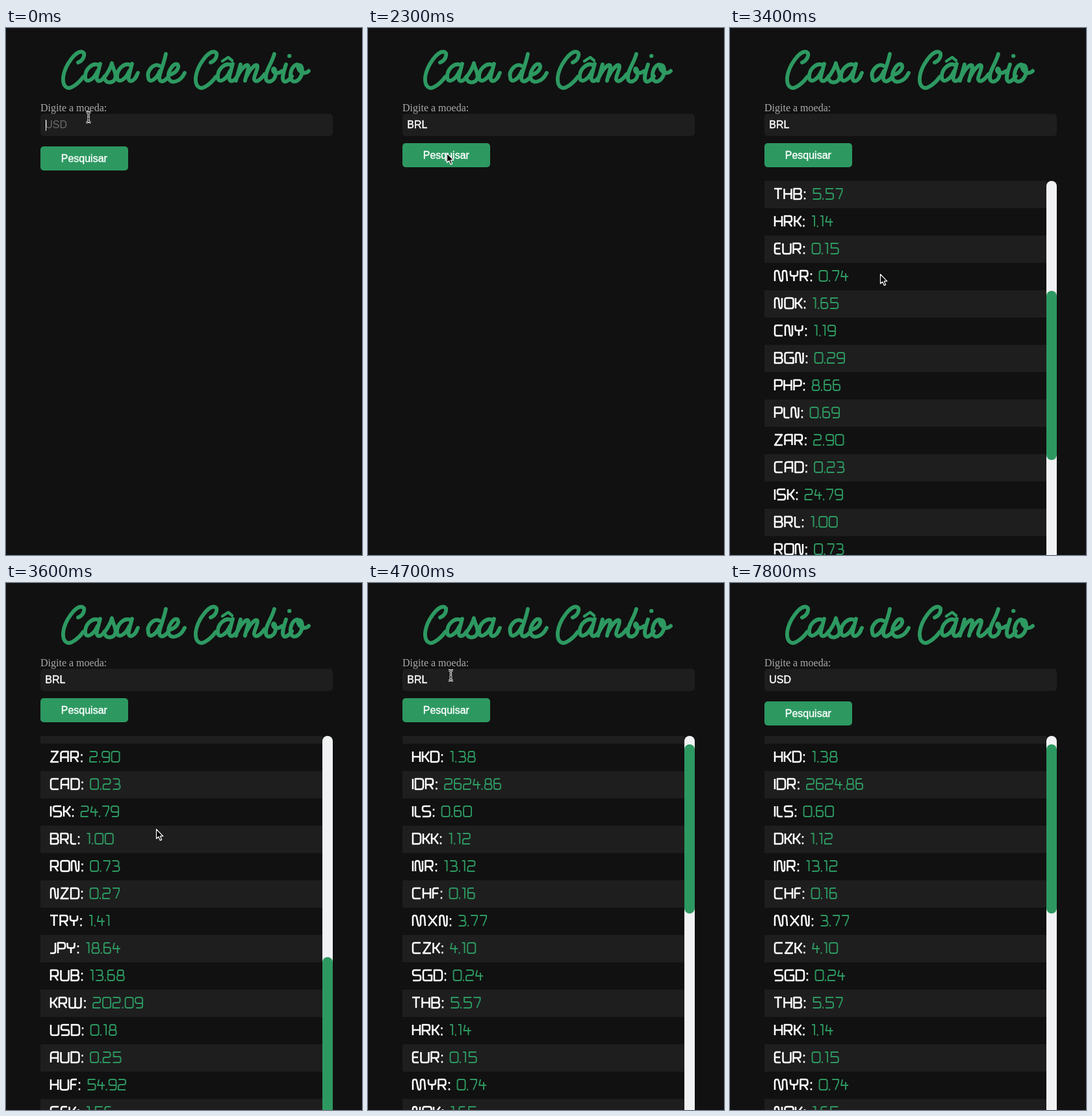
Animation of 548x810 px, one loop 8000 ms. Source, as an HTML page:

```html
<!DOCTYPE html>
<html lang="pt-BR">
<head>
<meta charset="utf-8">
<title>Casa de Câmbio</title>
<style>
  html, body { margin: 0; width: 100%; height: 100%; overflow: hidden; background: #111; }
  svg { display: block; width: 100vw; height: 100vh; }
  text { font: 16px "Liberation Sans", Arial, sans-serif; fill: #fff; stroke: #fff; stroke-width: .4; white-space: pre; }
  .label { font-family: "Liberation Serif", "Times New Roman", serif; fill: #aaa; stroke: none; }
  .hint { fill: #6c6c6c; stroke: none; }
  .panel { fill: #1e1e1e; }
  .green { fill: #2d9961; }
  .title, .glyphs, .cursor { fill: none; stroke-linejoin: round; }
  .title { stroke: #2d9961; stroke-width: 5.9; stroke-linecap: round; }
  .glyphs { stroke: #fff; stroke-width: 2.5; }
  .glyphs.value { stroke: #2d9961; stroke-width: 1.9; }
</style>
</head>
<body>
<svg viewBox="0 0 548 810">
  <defs>
    <clipPath id="listClip"><rect x="53" y="235" width="434" height="600"/></clipPath>
    <path id="bigC" d="M111 53C119 50 123 40 118 37C108 33 90 58 88 76C87 91 95 95 103 90C110 86 114 82 119 75"/>
    <path id="smallA" d="M143 57C133 52 121 64 122 76C123 86 135 80 141 66M145 55L140 74C138 84 146 84 152 74"/>
  </defs>

  <g class="title" role="img" aria-label="Casa de Câmbio">
    <use href="#bigC"/>
    <use href="#smallA"/>
    <path d="M150 78C156 70 161 62 163 54C164 62 171 70 168 78C165 85 155 85 153 80"/>
    <use href="#smallA" x="49"/>
    <path d="M199 77L203 69"/>
    <path d="M236 58C228 53 216 66 219 76C220 86 231 80 237 66M246 40C243 55 237 68 236 76C236 85 243 83 249 76"/>
    <path d="M251 72C262 70 268 60 264 56C258 53 249 66 250 76C252 87 268 84 275 69"/>
    <use href="#bigC" x="204"/>
    <use href="#smallA" x="204"/>
    <path stroke-width="4.5" d="M333 51L342 45L348 50"/>
    <path d="M361 56L354 81M356 75C362 62 371 54 373 58C374 62 369 75 368 81M370 75C376 62 385 54 387 58C388 64 381 74 382 79C384 84 390 82 398 71"/>
    <path d="M413 40C409 55 399 66 400 77C401 87 415 82 415 70C415 62 411 60 411 65C413 71 420 70 425 66"/>
    <path d="M431 56C428 66 424 76 427 81C430 85 436 80 440 74M436 43h.5"/>
    <path d="M448 56C440 58 436 70 439 79C443 87 455 80 456 66C456 58 452 55 449 58C450 68 460 72 466 66"/>
  </g>

  <text class="label" x="53" y="128">Digite a moeda:</text>
  <rect class="panel" x="53" y="132" width="450" height="34" rx="5"/>
  <rect id="selection" x="61" y="140" width="31" height="18" fill="#5a7da5"/>
  <text id="entry" x="60.3" y="154"></text>
  <rect id="caret" y="141" width="1" height="17" fill="#fff"/>

  <g id="button">
    <rect class="green" x="53" width="135" height="37" rx="5"/>
    <text x="120.3" y="24" text-anchor="middle">Pesquisar</text>
  </g>

  <g id="list">
    <g clip-path="url(#listClip)"><g id="rows"></g></g>
    <rect x="487" y="235" width="16" height="600" rx="8" fill="#f1f2f3"/>
    <rect id="thumb" class="green" x="487" y="235" width="16" height="260" rx="8"/>
  </g>

  <g id="arrow" class="cursor">
    <path fill="#000" stroke="#fff" stroke-width="1.2" d="M.5 .5V15L3.8 12L6.2 17.6L8.6 16.6L6.3 11.1H10.8Z"/>
  </g>
  <g id="beam" class="cursor">
    <path stroke="#fff" stroke-width="3" d="M-3.5-8Q0-8 0-5.5V5.5Q0 8-3.5 8M3.5-8Q0-8 0-5.5M3.5 8Q0 8 0 5.5M-2 2.5H2"/>
    <path stroke="#000" d="M-3.5-8Q0-8 0-5.5V5.5Q0 8-3.5 8M3.5-8Q0-8 0-5.5M3.5 8Q0 8 0 5.5M-2 2.5H2"/>
  </g>
</svg>

<script>
const LOOP = 8000, ROW = 42, LIST_TOP = 235, VIEW = 600;

// Each glyph: advance width, then its centre line on a 16 px tall grid.
const GLYPHS = {
  A: [15.5, 'M1 16V4Q1 0 5 0H12V16M1 9H12'],
  B: [15.5, 'M1 8H9Q12 8 12 4T9 0H1V16H9Q12.5 16 12.5 12T9 8'],
  C: [16, 'M13 0H4Q1 0 1 3V13Q1 16 4 16H13'],
  D: [16, 'M1 0H9Q13 0 13 4V12Q13 16 9 16H1Z'],
  E: [12.5, 'M10 0H4Q1 0 1 3V13Q1 16 4 16H10M1 8H9'],
  F: [12, 'M10 0H4Q1 0 1 3V16M1 8H9'],
  G: [17, 'M14 0H4Q1 0 1 3V13Q1 16 4 16H14V8H8'],
  H: [15, 'M1 0V16M12 0V16M1 8H12'],
  I: [4, 'M1 0V16'],
  J: [11, 'M8 0V13Q8 16 5 16H0'],
  K: [13, 'M1 0V16M1 8H5L11 0M5 8L11 16'],
  L: [11, 'M1 0V13Q1 16 4 16H9'],
  M: [24, 'M1 16V3Q1 0 4 0T7 3L9 13Q9.5 16 11 16T13 13V3Q13 0 16 0T19 3L20 16'],
  N: [15.5, 'M1 16V3Q1 0 4 0T7 3L8 13Q8.5 16 10 16T12 13V0'],
  O: [16.5, 'M4 0H11Q14 0 14 3V13Q14 16 11 16H4Q1 16 1 13V3Q1 0 4 0Z'],
  P: [14.5, 'M1 16V0H9Q12 0 12 3V6Q12 9 9 9H1'],
  R: [15.5, 'M1 16V0H9Q12 0 12 3V6Q12 9 9 9H1M7 9L12 16'],
  S: [16, 'M13 0H4Q1 0 1 3V5Q1 8 4 8H10Q13 8 13 11V13Q13 16 10 16H1'],
  T: [14.5, 'M0 0H12M6 0V16'],
  U: [16, 'M1 0V13Q1 16 4 16H10Q13 16 13 13V0'],
  W: [23, 'M1 0V13Q1 16 4 16H8Q10 16 10 13V0M10 13Q10 16 13 16H16Q19 16 19 13V0'],
  X: [17.5, 'M1 0L14 16M14 0L1 16'],
  Y: [15.5, 'M1 0V5Q1 8 4 8H9Q12 8 12 5V0M6.5 8V16'],
  Z: [15.5, 'M1 0H12L1 16H13'],
  0: [15.5, 'M4 0H10Q13 0 13 3V13Q13 16 10 16H4Q1 16 1 13V3Q1 0 4 0Z'],
  1: [8.7, 'M1 0H5V16'],
  2: [15, 'M1 0H9Q12 0 12 3V5Q12 8 9 8H4Q1 8 1 11V16H12'],
  3: [14.5, 'M1 0H8Q11 0 11 4T8 8H4M8 8Q12 8 12 12T8 16H1'],
  4: [13.5, 'M3 0L1 9H12M8 4V16'],
  5: [15.5, 'M13 0H2V7H10Q13 7 13 10V13Q13 16 10 16H1'],
  6: [14, 'M10 0H4Q1 0 1 3V13Q1 16 4 16H8Q11 16 11 13V10Q11 7 8 7H1'],
  7: [14, 'M1 0H11V4L6 16'],
  8: [14.5, 'M4 0H9Q11 0 11 4T9 8H4Q1 8 1 12T4 16H9Q12 16 12 12T9 8H4Q2 8 2 4T4 0'],
  9: [14.5, 'M2 16H9Q12 16 12 13V3Q12 0 9 0H4Q1 0 1 3V6Q1 9 4 9H12'],
  '.': [4, 'M1 14.5V17'],
  ':': [13.6, 'M2 4V6.8M2 13.8V16.6']
};

const RATES = `GBP 0.14,HKD 1.38,IDR 2624.86,ILS 0.60,DKK 1.12,INR 13.12,CHF 0.16,MXN 3.77,
CZK 4.10,SGD 0.24,THB 5.57,HRK 1.14,EUR 0.15,MYR 0.74,NOK 1.65,CNY 1.19,BGN 0.29,PHP 8.66,
PLN 0.69,ZAR 2.90,CAD 0.23,ISK 24.79,BRL 1.00,RON 0.73,NZD 0.27,TRY 1.41,JPY 18.64,RUB 13.68,
KRW 202.09,USD 0.18,AUD 0.25,HUF 54.92,SEK 1.56`.split(',').map(pair => pair.trim().split(' '));

// Tracks hold their value until the next entry: [time, ...values].
const ENTRY = [[0, ''], [900, 'B'], [1200, 'BR'], [1300, 'BRL'],
  [6000, 'U'], [6200, 'UD'], [6900, 'U'], [7100, 'US'], [7300, 'USD']];
const CARET = [[0, 1], [300, 0], [800, 1], [1700, 0], [4900, 1], [5000, 0],
  [6000, 1], [6700, 0], [6900, 1], [7800, 0]];
const SELECTED = [[0, 0], [5000, 1], [6000, 0]];
const FOCUS = [[0, 1], [2200, 0], [4900, 1]];
const LISTED = [[0, 0], [2400, 1]];
// Scroll offset, then how far the thumb trails behind it.
const SCROLL = [[0, 0, 0], [3300, 120, 0], [3400, 420, -30], [3500, 690, -30], [3600, 786, 0],
  [4000, 720, 20], [4100, 540, 36], [4200, 336, 36], [4300, 196, 25], [4400, 110, 15],
  [4500, 60, 8], [4600, 38, 2], [4700, 30, 0]];
const POINTER = [[0, 'beam', 127, 137], [900, ''], [1900, 'beam', 127, 142],
  [2000, 'arrow', 124, 172], [2100, 'arrow', 121, 192],
  [3000, 'arrow', 150, 232], [3100, 'arrow', 200, 322], [3200, 'arrow', 231, 378],
  [4100, 'arrow', 222, 352], [4200, 'arrow', 207, 315], [4300, 'arrow', 185, 265],
  [4400, 'arrow', 160, 215], [4500, 'arrow', 140, 172], [4600, 'beam', 128, 146],
  [4700, 'beam', 127.5, 142], [6000, '']];

const el = id => document.getElementById(id);
const at = (track, t) => track.findLast(step => step[0] <= t).slice(1);
const show = (node, on) => node.setAttribute('visibility', on ? 'visible' : 'hidden');
const move = (node, x, y) => node.setAttribute('transform', `translate(${x} ${y})`);

function write(text, x, y, kind) {
  const paths = [...text].map(char => {
    const [advance, d] = GLYPHS[char];
    const path = `<path transform="translate(${x} ${y})" d="${d}"/>`;
    x += advance;
    return path;
  });
  return [`<g class="glyphs ${kind}" role="img" aria-label="${text}">${paths.join('')}</g>`, x];
}

el('rows').innerHTML = RATES.map(([code, rate], i) => {
  const y = LIST_TOP + i * ROW;
  const [name, end] = write(code + ':', 68, y + 12, 'code');
  const [value] = write(rate, end, y + 12, 'value');
  const band = i % 2 ? '' : `<rect class="panel" x="53" y="${y}" width="434" height="${ROW}"/>`;
  return band + name + value;
}).join('');

const entry = el('entry');

function draw(t) {
  const [typed] = at(ENTRY, t);
  entry.textContent = typed;
  const width = typed ? entry.getComputedTextLength() : 0;
  if (!typed) entry.textContent = 'USD';
  entry.setAttribute('class', typed ? '' : 'hint');
  el('caret').setAttribute('x', Math.round(61 + width));
  show(el('caret'), at(CARET, t)[0]);
  show(el('selection'), at(SELECTED, t)[0]);

  move(el('button'), 0, at(FOCUS, t)[0] ? 182 : 177);

  const [scroll, lag] = at(SCROLL, t);
  show(el('list'), at(LISTED, t)[0]);
  move(el('rows'), 0, -scroll);
  move(el('thumb'), 0, Math.round((scroll + lag) * VIEW / (RATES.length * ROW)));

  const [kind, x = 0, y = 0] = at(POINTER, t);
  for (const name of ['arrow', 'beam']) {
    show(el(name), kind === name);
    move(el(name), x, y);
  }
}

const start = performance.now();
function tick() {
  draw((performance.now() - start) % LOOP);
  requestAnimationFrame(tick);
}
tick();
</script>
</body>
</html>
```
